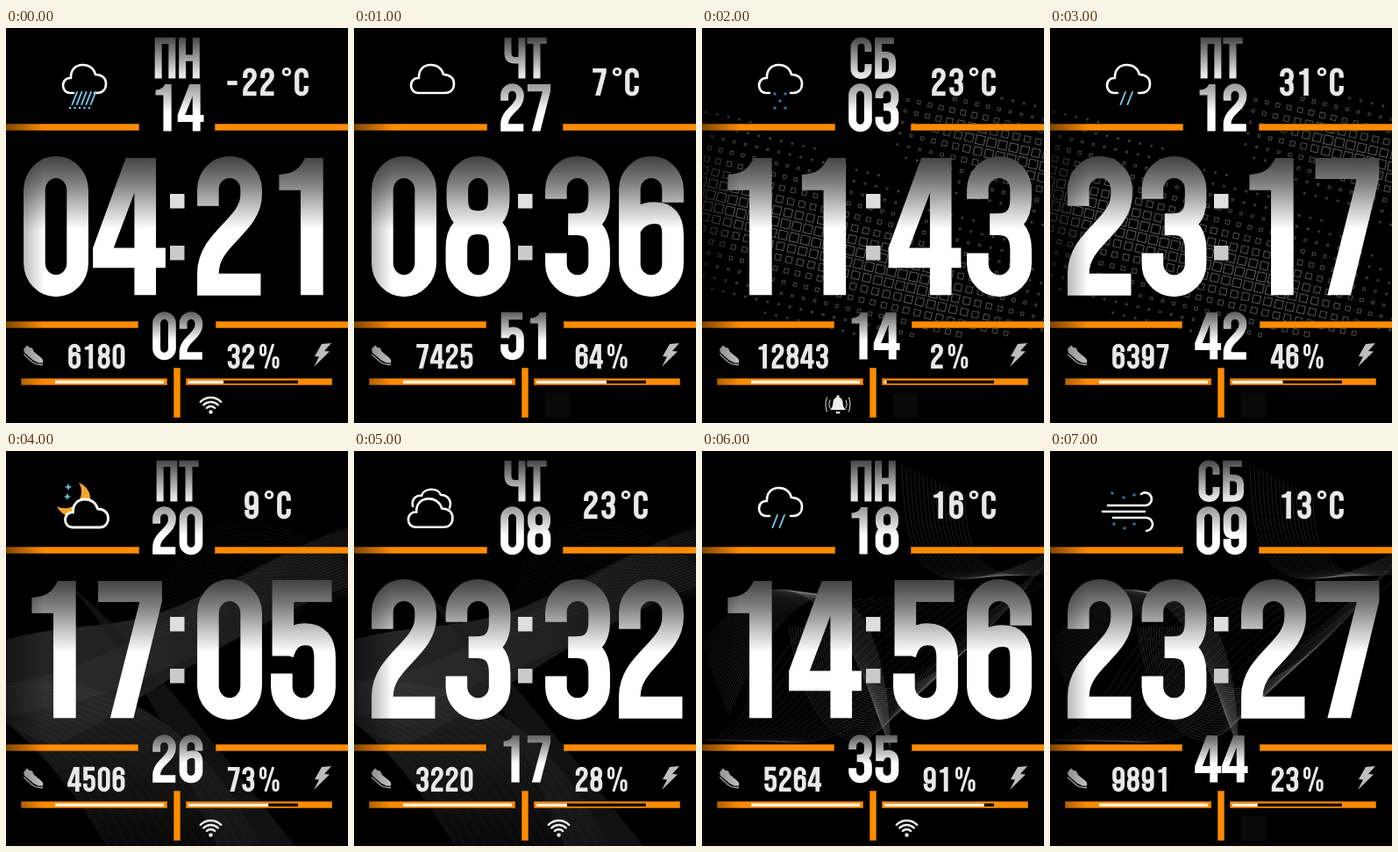
An HTML page for the animation above (8000 ms loop, 390x450 px).

```html
<!DOCTYPE html>
<html lang="ru">
<head>
<meta charset="utf-8">
<title>Watch face</title>
<style>
html, body { margin: 0; width: 100%; height: 100%; overflow: hidden; background: #000; }
svg { display: block; width: 390px; height: 450px; }
</style>
</head>
<body>
<svg viewBox="0 0 390 450" fill="none">
  <defs>
    <linearGradient id="big" gradientUnits="userSpaceOnUse" x1="0" y1="-2" x2="0" y2="159">
      <stop offset="0" stop-color="#404040"/><stop offset=".2" stop-color="#828282"/>
      <stop offset=".38" stop-color="#cacaca"/><stop offset=".52" stop-color="#fff"/>
    </linearGradient>
    <linearGradient id="day" gradientUnits="userSpaceOnUse" x1="0" y1="-2" x2="0" y2="159">
      <stop offset="0" stop-color="#444"/><stop offset=".9" stop-color="#e6e6e6"/>
    </linearGradient>
    <linearGradient id="date" gradientUnits="userSpaceOnUse" x1="0" y1="-2" x2="0" y2="159">
      <stop offset="0" stop-color="#969696"/><stop offset=".6" stop-color="#fff"/>
    </linearGradient>
    <linearGradient id="sec" gradientUnits="userSpaceOnUse" x1="0" y1="-2" x2="0" y2="159">
      <stop offset="0" stop-color="#5c5c5c"/><stop offset=".6" stop-color="#fff"/>
    </linearGradient>
    <linearGradient id="shade" gradientUnits="userSpaceOnUse" x1="0" y1="0" x2="44" y2="0">
      <stop offset="0" stop-color="#000" stop-opacity=".5"/>
      <stop offset="1" stop-color="#000" stop-opacity="0"/>
    </linearGradient>
    <linearGradient id="smoke" x1="0" y1="0" x2="1" y2="0">
      <stop offset="0" stop-color="#343434"/><stop offset=".55" stop-color="#262626"/>
      <stop offset="1" stop-color="#101010"/>
    </linearGradient>
    <linearGradient id="smokeLow" x1="0" y1="0" x2="0" y2="1">
      <stop offset="0" stop-color="#2c2c2c"/><stop offset="1" stop-color="#0b0b0b"/>
    </linearGradient>
  </defs>
  <g id="backs"></g>
  <g id="bars"></g>
  <g id="face"></g>
  <rect width="44" height="450" fill="url(#shade)"/>
</svg>
<script>
const $ = id => document.getElementById(id);

// Condensed letterforms: centred on x = 0, cap height 157, stem 25.
const strokes = {
  0: 'M-25 37V120A25 26.5 0 0 0 25 120V37A25 26.5 0 0 0-25 37Z',
  2: 'M-25 55V36A25 25.5 0 0 1 25 36V42C25 78-25 92-25 132V145H36',
  3: 'M-25 47V36A25 25.5 0 0 1 25 36V47Q25 76-2 76H-11M-11 76H-2Q25 76 25 105V121A25 25.5 0 0 1-25 121V109',
  5: 'M33 11.5H-23.5V86M-23.5 84Q-17 61 2 61Q25 61 25 88V121A25 25.5 0 0 1-25 121V106',
  6: 'M25 51V36A25 25.5 0 0 0-25 36V121A25 25.5 0 0 0 25 121V88C25 71 18 63 4 63Q-14 63-23 78',
  8: 'M0 73Q-24 73-24 48V36A24 25.5 0 0 1 24 36V48Q24 73 0 73ZM0 75Q-25 75-25 103V121A25 25.5 0 0 0 25 121V103Q25 75 0 75Z',
  9: 'M-25 106V121A25 25.5 0 0 0 25 121V36A25 25.5 0 0 0-25 36V69C-25 86-18 94-4 94Q14 94 23 79',
  'П': 'M-24.5 157V11.5H24.5V157',
  'Н': 'M-24.5 0V157M24.5 0V157M-24.5 78H24.5',
  'С': 'M25 54V36A25 25.5 0 0 0-25 36V121A25 25.5 0 0 0 25 121V101',
  'Б': 'M31 11.5H-24.5V145.5H-2Q25 145.5 25 119V93Q25 66-2 66H-22',
  'Т': 'M-35 11.5H35M0 0V157',
  'Ч': 'M-25 0V58Q-25 87 0 87H25M25 0V157',
  '-': 'M-27 84H27',
  '°': 'M-18 20A18 18 0 1 1 18 20A18 18 0 1 1-18 20Z',
  '%': 'M-54 23A14 16 0 0 1-26 23V55A14 16 0 0 1-54 55ZM24 102A14 16 0 0 1 52 102V134A14 16 0 0 1 24 134ZM23 0L-25 157'
};
const fills = {
  1: 'M-28 19C-10 18-4 12 2 0H23V157H-3V37H-28Z',
  4: 'M-5 0H30V103H41V126H30V157H5V126H-43V103ZM5 40L-19 103H5Z',
  7: 'M-37 0H37V23L4 157H-23L11 24H-37Z'
};
const thin = { '°': 14, '%': 16 };

function glyph(ch, x, y, sx, sy, paint) {
  const at = `transform="translate(${x} ${y}) scale(${sx} ${sy})"`;
  return fills[ch]
    ? `<path ${at} d="${fills[ch]}" fill="${paint}" fill-rule="evenodd"/>`
    : `<path ${at} d="${strokes[ch]}" stroke="${paint}" stroke-width="${thin[ch] || 25}"/>`;
}

// Sets a word from the centre of its first letter.
function word(text, x, pitch, y, sx, sy, paint) {
  const shapes = [...text].map((ch, i) => glyph(ch, x + i * pitch, y, sx, sy, paint)).join('');
  return `<g role="img" aria-label="${text}">${shapes}</g>`;
}

const rect = (x, y, w, h, fill) => `<rect x="${x}" y="${y}" width="${w}" height="${h}" fill="${fill}"/>`;
const bar = (x, y, w, h) => rect(x, y, w, h, '#b46200') + rect(x + 1, y + 1, w - 2, h - 2, '#ff8c00');
const line = (d, w = 2.6, color = '#fff', fill = 'none') =>
  `<path d="${d}" stroke="${color}" stroke-width="${w}" fill="${fill}" stroke-linecap="round" stroke-linejoin="round"/>`;
const dots = (list, r, color) => list.map(([x, y]) => `<circle cx="${x}" cy="${y}" r="${r}" fill="${color}"/>`).join('');

// Weather icons
const cloud = 'M77 74H73C68 74 65 70 65 65.500C65 60 69 56.500 74 57C73.500 48 79 42 87.500 42C95 42 100.500 46.500 102 53C109 53 114 57 114 63.500C114 70 110 74 104 74H101';
const rain = (n, x) => Array.from({ length: n }, (_, i) =>
  line(`M${x + i * (n > 2 ? 5.3 : 8)} 73l-5.5 14`, 2, '#74bfe0')).join('');
const star = (x, y, r) => `<path d="M${x} ${y - r}L${x + r / 3} ${y - r / 3}L${x + r} ${y}L${x + r / 3} ${y + r / 3}L${x} ${y + r}L${x - r / 3} ${y + r / 3}L${x - r} ${y}L${x - r / 3} ${y - r / 3}Z" fill="#5fb4d6"/>`;
const weather = {
  pour: () => line(cloud) + rain(5, 81) + dots([0, 1, 2, 3, 4].map(i => [73 + i * 5.5, 91]), 1.3, '#74bfe0'),
  snow: () => line(cloud) + dots([[83, 75], [95, 75], [89, 83], [83, 91], [95, 91]], 1.8, '#2f7590'),
  drizzle: () => line(cloud) + rain(2, 86),
  cloudy: () => line(cloud + 'Z'),
  night: () => '<path d="M83 36A20 20 0 1 1 58 63A19 19 0 0 0 83 36Z" fill="#f5a52c"/>' +
    star(71, 41, 4) + star(70, 52, 4) +
    `<g transform="translate(2.5 13)">${line(cloud + 'Z', 2.8, '#fff', '#000')}</g>`,
  overcast: () => line('M67 63C65 54 72 50 77 51C79 42 96 41 99 50C107 50 112 57 109 65') +
    `<g transform="translate(-5 12) scale(1.03 1.01)">${line(cloud + 'Z', 2.6, '#fff', '#000')}</g>`,
  wind: () => line('M66 62H108A7.3 7.3 0 1 0 104 49M60 69H108M72 76H109A7.3 7.3 0 0 1 110 91') +
    dots([[71, 48], [84, 53], [96, 50], [73, 83], [85, 88], [96, 83]], 1.8, '#2f7590')
};

// Status icons
const wifiArc = r => `M${233.5 - r * .71} ${437.5 - r * .71}A${r} ${r} 0 0 1 ${233.5 + r * .71} ${437.5 - r * .71}`;
const wifi = line([6.5, 11.5, 16.5].map(wifiArc).join(''), 2.5, '#e6e6e6') + dots([[233.5, 437.5]], 2.2, '#e6e6e6');
const bell = '<path d="M146 435Q149.500 432 149.500 426Q150 421 155 420.500Q160 421 160.500 426Q160.500 432 164 435ZM152.500 437H157.500A2.500 2.500 0 0 1 152.500 437ZM153.500 418.500H156.500V421H153.500Z" fill="#eee"/>' +
  line('M146 424Q144 429 146 433M142.500 421Q139.500 429 142.500 437M164 424Q166 429 164 433M167.500 421Q170.500 429 167.500 437', 1.2, '#bbb');

// Backgrounds
function squares() {
  const turn = 13 * Math.PI / 180, cos = Math.cos(turn), sin = Math.sin(turn), step = 13;
  let out = '';
  for (let u = 0; u < 480; u += step) for (let v = -90; v < 390; v += step) {
    const x = u * cos - v * sin, y = u * sin + v * cos;
    if (x < -5 || x > 395 || y < 78 || y > 350) continue;
    const low = Math.exp(-(((y - 188 - x * .42) / 52) ** 2)) * Math.min(1, (400 - x) / 130);
    const high = Math.exp(-(((y - 135 - (x - 330) * .4) / 36) ** 2)) * Math.max(0, Math.min(1, (x - 215) / 100));
    const g = Math.max(low, high), s = 1.4 + 8.6 * g;
    if (g < .015) continue;
    out += `<rect x="${-s / 2}" y="${-s / 2}" width="${s}" height="${s}" transform="translate(${x.toFixed(1)} ${y.toFixed(1)}) rotate(13)" stroke="#909090" stroke-opacity="${(.45 + .2 * g).toFixed(2)}"/>`;
  }
  return out;
}

// Blends one cubic curve into another.
function family(a, b, n, alpha, width = .6) {
  let d = '';
  for (let i = 0; i < n; i++) {
    const p = a.map((v, k) => (v + (b[k] - v) * i / (n - 1)).toFixed(1));
    d += `M${p[0]} ${p[1]}C${p.slice(2).join(' ')}`;
  }
  return `<path d="${d}" stroke="#aaa" stroke-opacity="${alpha}" stroke-width="${width}"/>`;
}

const backs = {
  none: () => '',
  squares,
  smoke: () =>
    '<path d="M0 215C70 195 130 205 200 175S320 110 390 88V155C270 195 150 290 60 335Q30 330 0 310Z" fill="url(#smoke)" opacity=".75"/>' +
    '<path d="M0 264C110 258 210 290 290 450H115C75 385 35 335 0 310Z" fill="url(#smokeLow)" opacity=".8"/>' +
    '<path d="M70 150C130 200 180 260 330 450H240C200 350 150 240 70 150Z" fill="#1d1d1d" opacity=".6"/>' +
    family([0, 265, 130, 250, 240, 150, 390, 85], [0, 300, 130, 290, 260, 200, 390, 165], 24, .16) +
    family([200, 110, 260, 60, 320, 80, 390, 130], [160, 215, 250, 190, 320, 150, 390, 165], 22, .11) +
    family([0, 262, 110, 258, 210, 290, 290, 450], [0, 310, 50, 340, 90, 390, 115, 450], 16, .1),
  mesh: () =>
    family([228, 15, 232, 110, 240, 190, 390, 118], [300, 50, 300, 120, 320, 150, 390, 140], 16, .28) +
    family([0, 222, 80, 110, 150, 150, 200, 300], [30, 300, 120, 90, 210, 140, 215, 340], 24, .34) +
    family([100, 200, 110, 300, 180, 400, 240, 260], [170, 200, 150, 250, 210, 360, 390, 130], 24, .34) +
    family([0, 330, 60, 330, 90, 180, 170, 170], [90, 330, 180, 350, 260, 230, 390, 150], 18, .24)
};

// Each state: weather, temperature, weekday, date, hours + minutes, seconds, steps, charge, background, status
const states = [
  ['pour', '-22', 'ПН', '14', '0421', '02', '6180', 32, 'none', 'wifi'],
  ['cloudy', '7', 'ЧТ', '27', '0836', '51', '7425', 64, 'none', ''],
  ['snow', '23', 'СБ', '03', '1143', '14', '12843', 2, 'squares', 'bell'],
  ['drizzle', '31', 'ПТ', '12', '2317', '42', '6397', 46, 'squares', ''],
  ['night', '9', 'ПТ', '20', '1705', '26', '4506', 73, 'smoke', 'wifi'],
  ['overcast', '23', 'ЧТ', '08', '2332', '17', '3220', 28, 'smoke', 'wifi'],
  ['drizzle', '16', 'ПН', '18', '1456', '35', '5264', 91, 'mesh', 'wifi'],
  ['wind', '13', 'СБ', '09', '2327', '44', '9891', 23, 'mesh', '']
];

const pale = '#e8e8e8';

function face([icon, temp, day, date, time, sec, steps, charge, , status]) {
  const level = String(charge);
  const tx = 290 - temp.length * 10 - (temp[0] === '-' ? 2 : 0);
  const unit = 290 + (temp.length - 2) * 10 + 20;
  const narrow = day[1] === 'Т';
  const cx = 276.3 - level.length * 8.3;
  const px = cx + (level.length - 1) * 16.6 + 24.2;
  return weather[icon]() +
    word(temp, tx, 20, 46, .21, .198, pale) +
    glyph('°', unit, 46, .21, .198, pale) + glyph('С', unit + 17, 46, .21, .198, pale) +
    word(day, narrow ? 183.5 : 181.5, narrow ? 25 : 27.5, 11, .32, .296, 'url(#day)') +
    word(date, 180.5, 30.5, 64, .355, .341, 'url(#date)') +
    word(time.slice(0, 2), 57, 84.5, 148, .985, .995, 'url(#big)') +
    word(time.slice(2), 255, 84, 148, .985, .995, 'url(#big)') +
    rect(187, 189, 16.5, 16.5, '#dedede') + rect(187, 248, 16.5, 16.5, '#cacaca') +
    word(sec, 180.5, 30.5, 324, .355, .341, 'url(#sec)') +
    word(steps, 103.3 - (steps.length - 1) * 8.4, 16.8, 360, .185, .178, pale) +
    word(level, cx, 16.6, 360, .185, .178, pale) + glyph('%', px, 360, .185, .178, pale) +
    rect(208, 401.5, 125, 3.5, '#140a00') + rect(208, 401.5, 125 * charge / 100, 3.5, '#fff0da') +
    (status === 'wifi' ? wifi : rect(218, 416, 28, 28, '#090909')) +
    (status === 'bell' ? bell : '');
}

$('backs').innerHTML = Object.keys(backs).map(k => `<g id="back-${k}">${backs[k]()}</g>`).join('');
$('bars').innerHTML =
  bar(-1, 109, 153, 8) + bar(238, 109, 153, 8) +
  bar(-1, 334, 152, 8) + bar(239, 334, 152, 8) +
  bar(17, 399, 167, 8) + bar(205, 399, 167, 8) +
  bar(191, 387, 8, 57) + rect(56, 401.5, 124, 3.5, '#fff0da') +
  '<path d="M20 366L24 361.500Q27 365 30 364.500L31.500 368.500L40 375.500Q43 378 42 381.500H37L31 378.500L21 370Z" fill="#c4c4c4"/>' +
  line('M20.500 372L30 380.500Q34 383.500 41.500 383.500', 1.3, '#c4c4c4') +
  '<path d="M360 360L371 359L363 368L369 368.500L351 386L357 374.500L352 374Z" fill="#bebebe"/>';

let shown = -1;
function draw(ms) {
  const i = Math.floor(ms % 8000 / 1000);
  if (i === shown) return;
  shown = i;
  for (const k in backs) $('back-' + k).style.display = k === states[i][8] ? '' : 'none';
  $('face').innerHTML = face(states[i]);
}
function tick() {
  draw(performance.now());
  requestAnimationFrame(tick);
}
tick();
</script>
</body>
</html>
```
